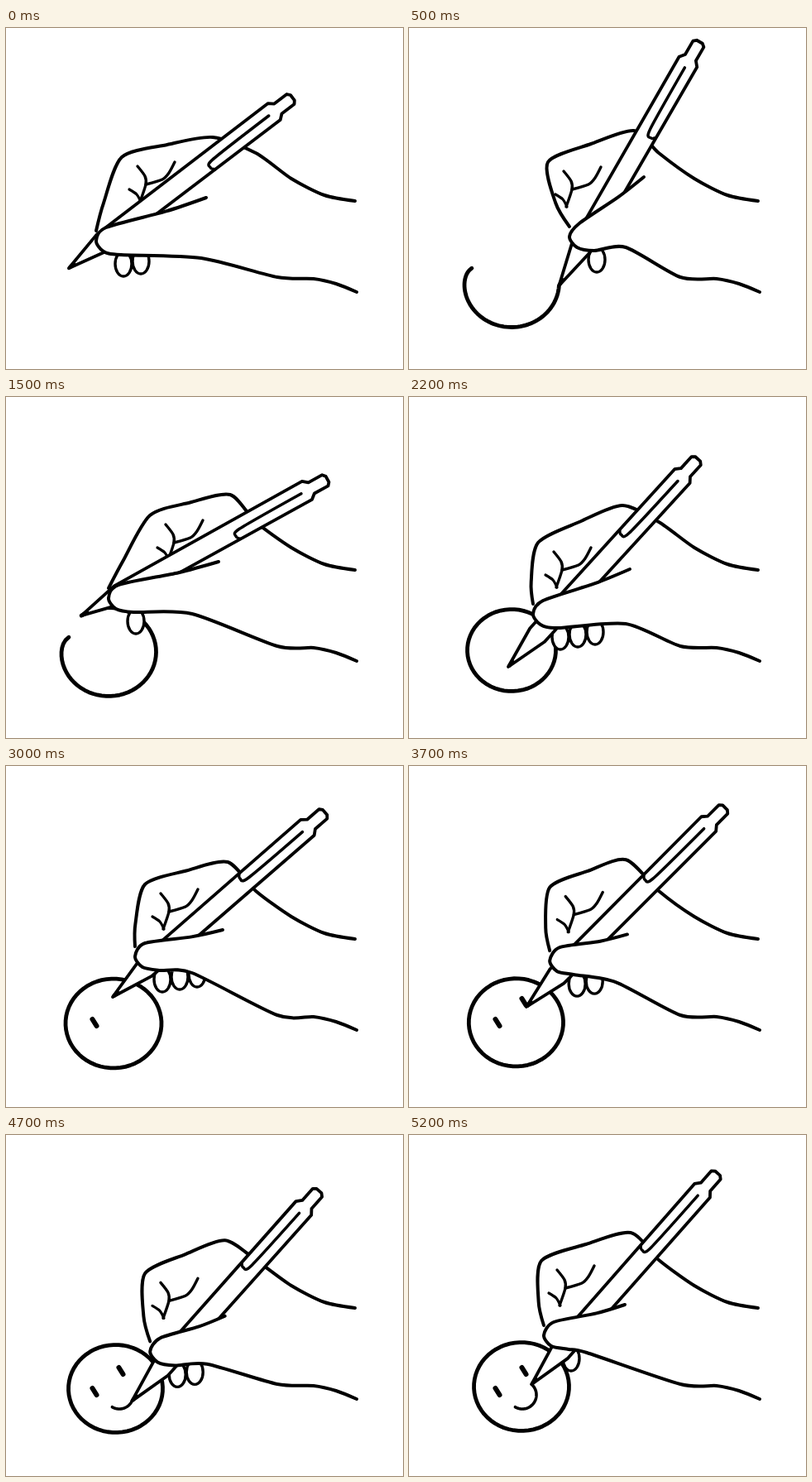
An HTML page with a canvas for the animation above (5300 ms loop, 480 by 412 pixels).

```html
<!DOCTYPE html>
<html lang="en">
<head>
<meta charset="utf-8">
<title>Hand drawing a smile</title>
<style>
html, body { margin: 0; width: 100%; height: 100%; overflow: hidden; background: #fff; }
canvas { display: block; }
</style>
</head>
<body>
<canvas id="stage" width="480" height="412"></canvas>
<script>
const ctx = document.getElementById('stage').getContext('2d');
const LOOP = 5300, RING_END = 1700, SMILE_START = 4200;

// Hand joints: time, thumb tip, first knuckle, last knuckle, thumb crease, heel, visible fingers
const joints = [
  [0,    109, 257, 140, 156, 250, 132, 242, 205, 236, 278, 2],
  [500,  194, 252, 168, 162, 272, 124, 284, 180, 262, 265, 1],
  [1500, 124, 243, 174, 143, 271, 118, 257, 199, 225, 262, 1],
  [2200, 150, 262, 156, 176, 258, 131, 267, 208, 262, 274, 3],
  [3000, 156, 230, 168, 143, 268, 116, 262, 198, 225, 250, 3],
  [4200, 163, 270, 158, 174, 248, 130, 255, 226, 260, 285, 2],
  [5200, 163, 242, 160, 152, 268, 118, 261, 205, 215, 263, 1]];
const follow = [1, 0.8, 0.6, 0.6, 0.5];   // how far each joint goes along with the nib

// Pen: tilt in degrees, and nib position between the circle and the smile
const tilt = [[0, 37.3], [300, 68], [500, 60], [1000, 47], [1500, 29], [2200, 47.6],
  [2300, 66], [2500, 52], [3000, 41], [4200, 48], [5200, 48.6]];
const hover = [[1700, 78, 286], [2200, 120, 326], [2300, 103, 306], [2700, 109, 318],
  [3000, 129, 279], [3300, 142, 290], [3700, 142, 291], [4200, 136, 328]];

// Head: centre and radius; sweep: angle the drawn ring has reached
const RING_START = 3.52;
const head = [[0, 124, 308, 55.5], [1500, 124, 308, 55.5], [2200, 124, 306, 51.5],
  [3000, 130, 311, 56], [4200, 129, 309, 54.5], [5200, 136, 304, 55.5]];
const sweep = [[0, RING_START], [500, 0.06], [1500, -2.18], [1700, RING_START - 2 * Math.PI]];

const clamp = v => Math.max(0, Math.min(1, v));
const mix = (a, b, u) => a + (b - a) * u;
const mixPoint = (p, q, u) => [mix(p[0], q[0], u), mix(p[1], q[1], u)];
const add = ([x, y], dx, dy) => [x + dx, y + dy];

// Linear interpolation of rows that start with a time
function track(rows, t) {
  let i = 0;
  while (i < rows.length - 2 && rows[i + 1][0] <= t) i++;
  const a = rows[i], b = rows[i + 1], u = clamp((t - a[0]) / (b[0] - a[0]));
  return a.slice(1).map((v, j) => mix(v, b[j + 1], u));
}

function ringPoint(t, a) {
  const [cx, cy, r] = track(head, t);
  const hook = t < RING_END ? 0.1 * Math.exp((a - RING_START) * 6) : 0;
  return [cx + (r + 2) * (1 - hook) * Math.cos(a), cy + (r - 2) * (1 - hook) * Math.sin(a)];
}

const smilePoint = a => [137 + 17 * Math.cos(a), 314 + 17 * Math.sin(a)];
const smileEnd = t => mix(1.75, -0.85, (t - SMILE_START) / 1000);

function nibAt(t) {
  if (t < RING_END) return ringPoint(t, track(sweep, t)[0]);
  return t < SMILE_START ? track(hover, t) : smilePoint(smileEnd(t));
}
const restNib = joints.map(row => [row[0], ...nibAt(row[0])]);

function line(points, width, filled) {
  ctx.beginPath();
  points.forEach(p => ctx.lineTo(...p));
  paint(width, filled);
}
function paint(width, filled) {
  if (filled) {
    ctx.closePath();
    ctx.fill();
  }
  if (width) {
    ctx.lineWidth = width;
    ctx.stroke();
  }
}

// Gently rounded line through the points
function bend(points, width, filled) {
  const slope = i => {
    const a = points[i - 1], b = points[i + 1];
    return a && b ? [(b[0] - a[0]) * 0.13, (b[1] - a[1]) * 0.13] : [0, 0];
  };
  ctx.beginPath();
  ctx.moveTo(...points[0]);
  for (let i = 1; i < points.length; i++) {
    const [ax, ay] = slope(i - 1), [bx, by] = slope(i);
    ctx.bezierCurveTo(...add(points[i - 1], ax, ay), ...add(points[i], -bx, -by), ...points[i]);
  }
  paint(width, filled);
}

function arc(point, from, to, width) {
  line(Array.from({ length: 61 }, (_, i) => point(mix(from, to, i / 60))), width);
}

function eye(x, y, t, start, end) {
  if (t < start) return;
  const u = mix(0.2, 1, clamp((t - start) / (end - start)));
  line([[x - 2.5, y - 4], [x - 2.5 + 5 * u, y - 4 + 8 * u]], 6);
}

function drawFace(t) {
  if (t > 0) arc(a => ringPoint(t, a), RING_START, track(sweep, t)[0], 4.8);
  eye(107, 310, t, 2300, 2700);
  eye(139, 285, t, 3200, 3300);
  if (t >= SMILE_START) arc(smilePoint, 2.1, smileEnd(t), 3.6);
}

function drawPen(t, nib) {
  const a = track(tilt, t)[0] * Math.PI / 180, c = Math.cos(a), s = Math.sin(a);
  const at = (u, v) => [nib[0] + u * c + v * s, nib[1] - u * s + v * c];
  const profile = [[52, 12], [312, 12.5], [318, 7.5], [337, 7.5], [340, 4]];
  const upper = profile.map(([u, v]) => at(u, -v));
  const lower = profile.map(([u, v]) => at(u, v)).reverse();
  line([nib, ...upper, ...lower], 3.8, true);
  line([at(2, 0), at(8, 0)], 4.6);
  const side = t < 2200 ? 1 : -1;
  bend([at(304, 0), at(218, side), at(210, 7 * side), at(213, 12 * side)], 3.5);
}

function drawHand(t, nib) {
  const row = track(joints, t), rest = track(restNib, t);
  const [thumb, knuckle, last, crease, heel] = follow.map((w, i) =>
    [row[2 * i] + w * (nib[0] - rest[0]), row[2 * i + 1] + w * (nib[1] - rest[1])]);

  for (let i = Math.round(row[10]) - 1; i >= 0; i--) {
    ctx.beginPath();
    ctx.ellipse(thumb[0] + 33 + 21 * i, thumb[1] + 28 - 3 * i, 10, 15, 0, 0, 7);
    paint(3.4, true);
  }

  const back = [add(thumb, 0, -12), add(mixPoint(thumb, knuckle, 0.45), -5, 0), knuckle,
    add(mixPoint(knuckle, last, 0.5), 0, -3), last, [302, 151], [345, 182], [385, 202], [422, 209]];
  const grip = [crease, add(mixPoint(crease, add(thumb, 12, -16), 0.4), 0, 2),
    add(thumb, 12, -16), thumb, add(thumb, 9, 13), add(thumb, 30, 17), heel];
  const arm = [...grip, [328, 301], [372, 303], [399, 309], [424, 319]];
  line([...back, ...arm.slice().reverse()], 0, true);
  bend(back, 4);

  const fold = add(knuckle, 29, 33), near = (x, y) => add(fold, x, y);
  bend([near(-10, -22), near(-1, -10), fold, near(-7, 21)], 3.4);
  bend([fold, near(20, -6), near(28, -14), near(35, -27)], 3.4);
  bend([near(-20, 6), near(-11, 12), near(-6, 21)], 3.2);

  drawPen(t, nib);
  bend(grip, 0, true);
  bend(arm, 4);
}

function draw(t) {
  ctx.fillStyle = '#fff';
  ctx.fillRect(0, 0, 480, 412);
  ctx.strokeStyle = '#000';
  ctx.lineCap = ctx.lineJoin = 'round';
  drawFace(t);
  drawHand(t, nibAt(t));
}

// Six drawings a second, on a 100 ms grid
function tick() {
  const t = performance.now() % LOOP;
  const k = Math.floor((Math.floor(t / 100) * 100 + 50) * 6 / 1000);
  draw(Math.round(k * 10 / 6) * 100);
  requestAnimationFrame(tick);
}
tick();
</script>
</body>
</html>
```
